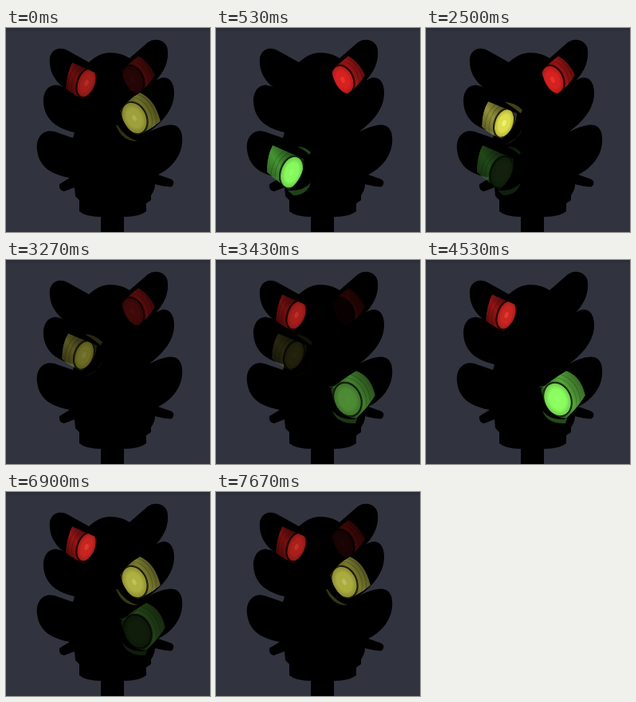
Write an HTML page that moves like this. It is 256 px wide and 256 px high and loops after 7.71 s.

```html
<!DOCTYPE html>
<html lang="en">
<head>
<meta charset="utf-8">
<title>Traffic light</title>
<style>
  html, body { margin: 0; width: 100%; height: 100%; overflow: hidden; background: #31333f; }
  svg { display: block; width: 100%; height: 100%; }
</style>
</head>
<body>
<svg id="stage" viewBox="0 0 256 256">
  <defs>
    <linearGradient id="sky" x2="0" y2="1">
      <stop stop-color="#292b36"/>
      <stop offset=".02" stop-color="#31333f"/>
      <stop offset="1" stop-color="#31333f"/>
    </linearGradient>
  </defs>
  <rect width="256" height="256" fill="url(#sky)"/>
  <path d="M104 43C113 35 121 31 131 31C141 31 149 34 155 38L178 18C187 11 203 15 203 29
    C204 42 199 54 188 66C198 59 207 62 210 73C214 90 207 110 180 130C199 121 215 116 220 131
    C225 151 214 173 191 184L208 190Q213 194 208 199Q203 200 187 196Q187 203 182 210L182 216
    L176 220L176 230Q168 237 148 237L148 256L119 256L119 237Q100 237 92 230L92 216L87 211L86 200
    L73 205Q66 204 67 196L80 188C57 184 41 174 39 153C37 137 47 126 61 130L84 138L86 131
    C62 126 48 113 47 93C46 77 57 68 69 73L88 82C70 77 56 63 55 44C53 29 65 22 77 28Z"/>
  <g id="lamps"></g>
</svg>
<script>
const PERIOD = 7710;

// mouth: visible opening; lens: cx, cy, rx, ry, tilt; on/off: start and duration in ms
const lamps = [
  { mouth: 'M83 43L114 57Q115 76 97 89Q84 84 75 76Q76 57 83 43Z', lens: [101, 69, 10.5, 18, 20],
    colors: ['#c82520', '#941414', '#f04a3c'], gamma: .5, on: [3280, 220], off: [7530, 510] },
  { mouth: 'M78 92L114 107Q114 125 95 139Q80 134 70 124Q70 105 78 92Z', lens: [98, 119.5, 11, 18, 20],
    bounce: 'M99 93Q111 93 121 103L119 107Q109 99 99 93ZM98 146Q114 143 120 127Q117 140 98 146Z',
    colors: ['#dede4c', '#93913a', '#ffff90'], gamma: 1, on: [2200, 300], off: [3030, 470] },
  { mouth: 'M71 147L110 164Q112 186 92 203Q76 192 64 181Q63 162 71 147Z', lens: [95, 181, 13, 20, 20],
    bounce: 'M102 149Q111 148 119 156L117 159Q110 152 102 149ZM90 204Q110 205 119 194Q114 210 97 210Z',
    colors: ['#86fa5c', '#459433', '#9dff76'], gamma: 2, on: [30, 300], off: [2200, 470] },
  { mouth: 'M145 54Q155 43 166 35Q180 43 187 59Q180 72 165 83Q150 78 145 54Z', lens: [159, 65, 12.5, 18, -24],
    colors: ['#d62120', '#981414', '#f8423a'], gamma: 1.7, on: [7530, 510], off: [3030, 470] },
  { mouth: 'M143 104Q152 90 168 81Q187 89 194 117Q180 129 166 134Q150 130 143 104Z', lens: [161, 113, 14.5, 20, -25],
    bounce: 'M138 122Q146 143 165 142Q149 137 140 122Z',
    colors: ['#d7d950', '#98993a', '#ffff9c'], gamma: .7, on: [6530, 500], off: [7530, 510] },
  { mouth: 'M144 162Q156 151 176 139Q195 146 200 170Q190 186 176 199Q150 197 144 162Z', lens: [165, 175, 16, 21, -23],
    bounce: 'M146 189Q157 203 177 199L175 205Q152 206 146 189ZM141 159Q150 160 168 148Q154 165 141 159Z',
    colors: ['#8bfe5f', '#56a63b', '#9cff75'], gamma: 1.6, on: [3280, 220], off: [6530, 500] }
];

function ellipse([x, y, rx, ry, tilt], grow, style) {
  return `<ellipse cx="${x}" cy="${y}" rx="${rx + grow}" ry="${ry + grow}" ` +
    `transform="rotate(${tilt} ${x} ${y})" ${style}/>`;
}

function lampMarkup({ mouth, lens, bounce = '', colors }, i) {
  const [lit, wall, spot] = colors;
  const [x, y, , , tilt] = lens;
  const slope = i < 3 ? 'x1="0" y1=".9" x2="1" y2=".1"' : 'x1="1" y1=".2" x2="0" y2=".8"';
  const rings = [7, 12].map(r => ellipse(lens, r, 'fill="none" stroke="#000" stroke-opacity=".22"')).join('');
  return `<defs>
      <linearGradient id="wall${i}" ${slope}>
        <stop stop-color="${wall}" stop-opacity=".5"/><stop offset=".42" stop-color="${wall}"/>
        <stop offset=".95" stop-color="${wall}" stop-opacity=".25"/>
      </linearGradient>
      <radialGradient id="lens${i}">
        <stop stop-color="${lit}"/><stop offset=".6" stop-color="${lit}"/>
        <stop offset="1" stop-color="${lit}" stop-opacity=".8"/>
      </radialGradient>
      <clipPath id="clip${i}"><path d="${mouth}"/></clipPath>
    </defs>
    <path class="glow" d="${bounce}" fill="${wall}" fill-opacity=".45"/>
    <g clip-path="url(#clip${i})">
      <g class="glow"><path d="${mouth}" fill="url(#wall${i})"/>${rings}</g>
      ${ellipse(lens, 2, '')}
      <g class="glow">${ellipse(lens, 1.2, `fill="none" stroke="${wall}" stroke-width=".6" opacity=".6"`)}</g>
      <g class="lens">
        ${ellipse(lens, 0, `fill="url(#lens${i})"`)}
        ${ellipse([x, y, 2.5, 4, tilt], 0, `fill="${spot}" opacity=".55"`)}
      </g>
    </g>`;
}

const wrap = t => (t % PERIOD + PERIOD) % PERIOD;

function level(t, { on, off }) {
  const since = wrap(t - on[0]);
  const held = wrap(off[0] - on[0]);
  return since < held ? Math.min(1, since / on[1]) : Math.max(0, 1 - (since - held) / off[1]);
}

const group = document.getElementById('lamps');
group.innerHTML = lamps.map((lamp, i) => `<g>${lampMarkup(lamp, i)}</g>`).join('');
const nodes = [...group.children].map(root => ({
  root, glows: root.querySelectorAll('.glow'), lens: root.querySelector('.lens')
}));

function draw(now) {
  const t = wrap(now);
  lamps.forEach((lamp, i) => {
    const { root, glows, lens } = nodes[i];
    const power = level(t, lamp);
    root.style.display = power ? '' : 'none';
    glows.forEach(glow => { glow.style.opacity = power ** .7; });
    lens.style.opacity = power ** lamp.gamma;
  });
}

const start = performance.now();
function tick() {
  draw(performance.now() - start);
  requestAnimationFrame(tick);
}
tick();
</script>
</body>
</html>
```
